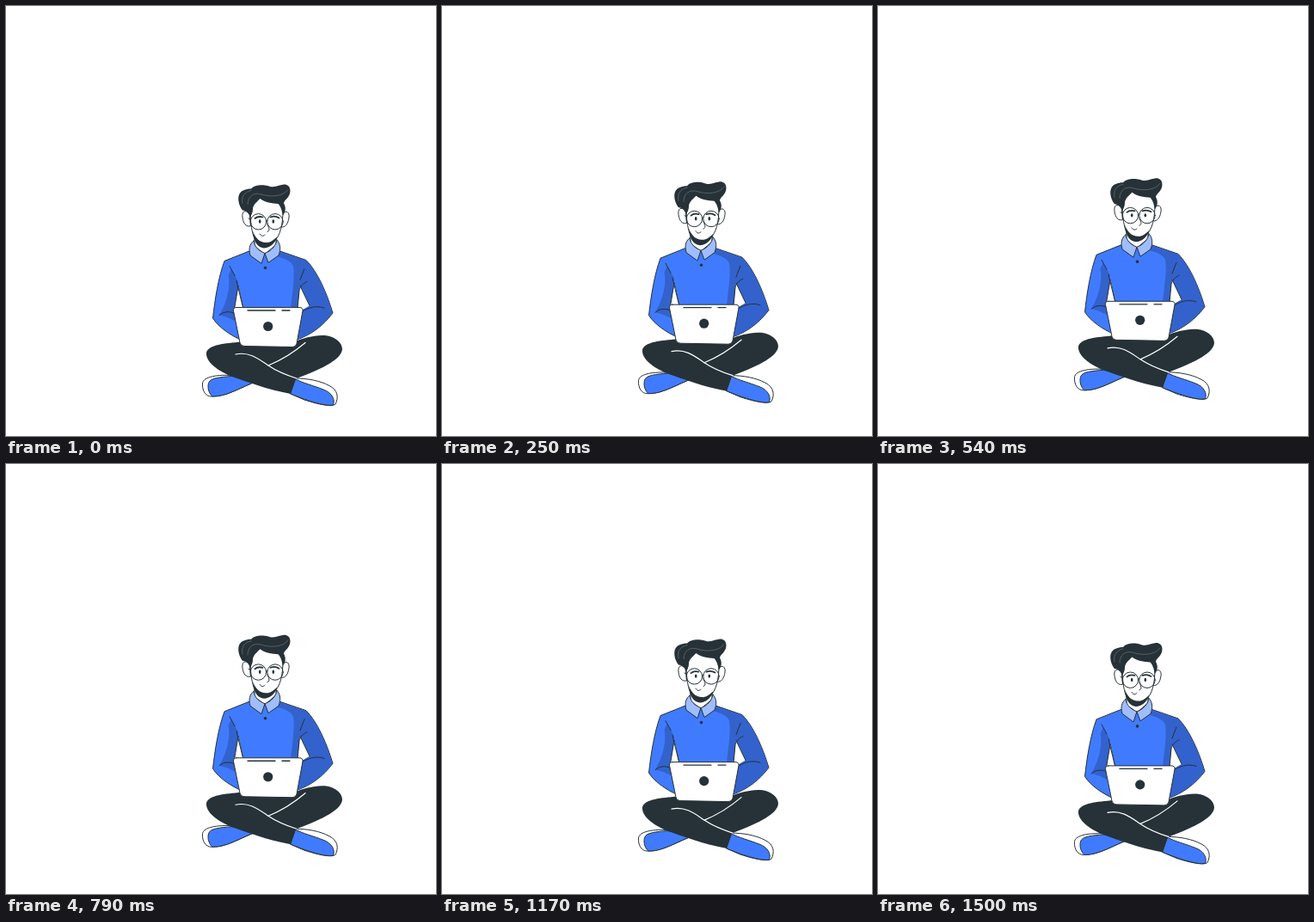
An HTML page for the animation above (1.54 s loop, 500 by 500 pixels).

```html
<!DOCTYPE html>
<html lang="en">
<head>
<meta charset="utf-8">
<title>Floating laptop worker</title>
<style>
html, body { margin: 0; width: 100%; height: 100%; overflow: hidden; background: #fff; }
svg { display: block; width: 100%; height: 100%; }
.line { fill: none; stroke: #263238; }
.white { fill: #fff; stroke: #263238; }
.blue { fill: #407bff; stroke: #263238; }
.shade { fill: #3362cc; }
.dark { fill: #263238; }
.pale { fill: #9fbdff; stroke: #263238; }
</style>
</head>
<body>
<svg viewBox="0 0 500 500" stroke-linecap="round" stroke-linejoin="round">
<g id="man">
  <!-- shoes -->
  <path class="white" d="M262 429C248 428 229 430 228.500 438.500C228 447 232 453.500 239 453.500C257 454 272 443 291.500 436Z"/>
  <path class="blue" d="M262 430C249 431 237 432 235.500 438C234 444 236 450 240 453.500C257 454 274 442 291.500 436Z"/>
  <path class="white" d="M337 432.500C350 432.500 365 435 376 441C386 446 387 455 383 462.500C379 466 364 463 347 457.500L331 450.500Z"/>
  <path class="blue" d="M337 433.500C345 438 358 441 369 445.500C379 449 383 457 380.500 463.500C372 465 354 460 331 450.500Z"/>

  <!-- legs -->
  <path class="dark" d="M338 389C349 384 361 382.500 371 382.500C383 384 391 391 391 398.500C390 410 371 420 337 433L331 450.500C302 445 282 437 262 430C245 423 232 413 233 402.500C236 393 254 392 274 390Z"/>
  <g fill="none" stroke="#fff" stroke-width="1.200">
    <path d="M267 404.500C283 401 294 410 305 417.500C316 425 327 429 338 432.500"/>
    <path d="M305 417.500C321 411 335 402 348 391"/>
  </g>

  <!-- sleeves and body -->
  <path class="blue" d="M284 284L254 296C247 315 243 340 240.500 362.500C247 373 262 383 274 388L276 352L265 355L270 325L276 352H339L341 326L352 348L344 354L337 388C355 382 369 371 380 356.500C373 333 362 308 349 295L317 284Z"/>
  <path class="shade" d="M262 305L270 320L266 347L265.500 356L268 367Q258 361 248 359C258 342 261 324 258.500 312Z"/>
  <path class="shade" d="M317 285L349 295.500C362 309 373 333 379.500 356.500C369 370.500 355 381 338 387.500L344 354L352 348L341 326L339 351H331C333 333 336 314 334 302C332 296 323 293 316 291Z"/>
  <path fill="#fff" d="M270 325L265 355L276 353Z"/>
  <path fill="#fff" d="M342 325L339 352H346L353 348Z"/>
  <path class="line" d="M260 302L266 313M268 319L276 352M270 325L265 355M248 359C254 354 260 354.500 267 357M347 305L342 318M350 320C345 322 342 326 341 330L339 351M342 325L353 348M344 355C352 350 360 347.500 370 350.500"/>

  <!-- ears, neck, face -->
  <path class="white" d="M283 240.500C278 235.500 274 238.500 275 245.500C276 252.500 279 256.500 284 255.500Z"/>
  <path class="white" d="M322 240.500C326 236.500 330 239.500 329 245.500C328 252.500 325 257.500 320 256.500Z"/>
  <path class="white" d="M289 263V279L301 288L314 277V264Z"/>
  <path class="white" d="M284 238C284 251 286 265 290 272C294 280 304 281 311 274C319 267 322 254 322 237L319 225L294 220Z"/>
  <path class="dark" d="M287 261C290 270 295 274 302 274.500C307 275 311 272 315.500 267.500C313 276 306 281 300 281C293 280 288 275 287 261Z"/>

  <!-- hair -->
  <path class="dark" d="M275 237C271 232 269 224 271 219C273 214 279 212 285 212C289 207 299 207 304 208.500C313 212 317 207 325 207C332 208.500 332 217.500 327 223C325 225 323 227 323 229C326 234 325 239 322 243C320.500 236 319 232 316.500 229.500C309 229 301 228 295.500 223.500C291 228 287 231 287 236C287 240 285 243 284 245C282 240 279 237 275 237Z"/>
  <path d="M281 230C281 221 288 215.500 297 218.500C308 222 323 221 328 213M275 229C273 221 278 215 285 214" fill="none" stroke="#69757b" stroke-width=".7"/>

  <!-- face details -->
  <g class="line">
    <circle cx="293.500" cy="250.300" r="9.200"/>
    <circle cx="313" cy="250.300" r="9.200"/>
    <path d="M302.500 249Q303.200 247.500 304 249M284.500 248L282 246.500M304 253C305 257 308 260 304 262M295 264.500C297 267.500 299 267.500 301 265.500"/>
    <path d="M289.500 246.500Q293 243.500 298.500 245M307.500 245Q313 243 317.500 246" stroke-width="1.800"/>
  </g>
  <ellipse class="dark" cx="295.200" cy="250" rx="1.300" ry="2.200"/>
  <ellipse class="dark" cx="310.800" cy="250" rx="1.300" ry="2.200"/>

  <!-- collar -->
  <path class="pale" d="M288 272.500C283 276.500 282 282 284 289.500L297 299L301 287C294 284 289 280 288 272.500Z"/>
  <path class="pale" d="M315 271.500C319 275.500 320 282 317 289.500L305 298L301 287C309 284 314 278 315 271.500Z"/>
  <circle class="dark" cx="301.500" cy="304" r="1.800"/>

  <!-- laptop -->
  <path class="white" d="M268 350H341Q345.500 350 345 354L338 392Q337 396 333 396L277 395Q273 395 272 391L264.500 354Q264 350 268 350Z"/>
  <path class="line" d="M281 353.500H313M321 353.500H330" stroke-width="1.300"/>
  <circle class="dark" cx="304.700" cy="372" r="5.600"/>
</g>
</svg>
<script>
const man = document.getElementById("man");
const LOOP = 1540, STEP = 1000 / 24, PEAK = 725, END = 1500, BASE = 0.5;

// Straight rise to the peak, then a straight fall.
function lift(t) {
  if (t < PEAK) return 9.6 * t / PEAK;
  return 9.6 - 10 * (Math.min(t, END) - PEAK) / (END - PEAK);
}

function draw(now) {
  const t = Math.floor((now % LOOP + 5) / STEP) * STEP;
  man.setAttribute("transform", `translate(0 ${(BASE - lift(t)).toFixed(2)})`);
}

const start = performance.now();
function tick() {
  draw(performance.now() - start);
  requestAnimationFrame(tick);
}
tick();
</script>
</body>
</html>
```
